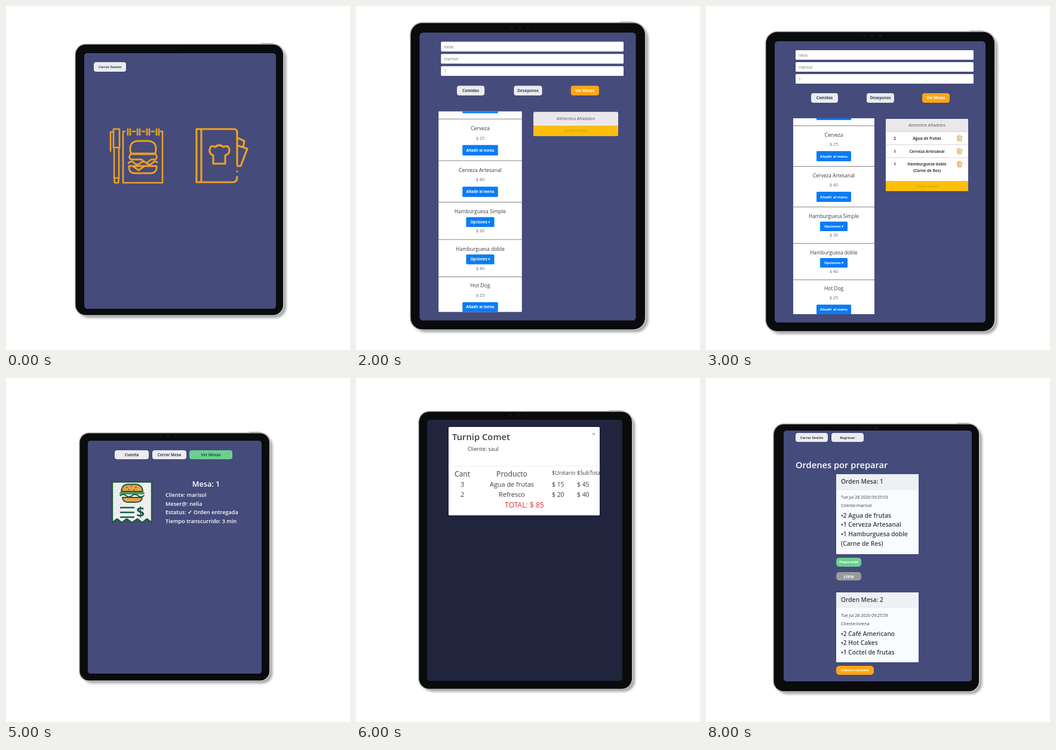
Recreate the animation shown at these times as an HTML page. Size 576x576 px, loop 9000 ms.

```html
<!DOCTYPE html>
<html lang="es">
<head>
<meta charset="utf-8">
<title>Pedidos en tableta</title>
<style>
html, body { margin: 0; width: 100%; height: 100%; overflow: hidden; background: #fff; }
svg { display: block; width: 100vw; height: 100vh; font-family: "Open Sans", "Noto Sans", sans-serif; }
.scene { visibility: hidden; }
.scene.on { visibility: visible; }
</style>
</head>
<body>
<svg id="stage" viewBox="0 0 576 576">
  <defs><filter id="soft"><feGaussianBlur stdDeviation="2"/></filter></defs>
</svg>
<script>
const NAVY = '#454b7b', ORANGE = '#fca616', INK = '#3c3d45', PALE = '#ebecef',
  GREEN = '#6ccf90', BLUE = '#0a7cf5', GOLD = '#eda11f', LEAF = '#205a42';

// Drawing helpers; each returns SVG markup.
const rect = (x, y, x2, y2, fill, r = 0, more = '') =>
  `<rect x="${x}" y="${y}" width="${x2 - x}" height="${y2 - y}" rx="${r}" fill="${fill}" ${more}/>`;
const text = (x, y, size, str, fill = INK, weight = 400, anchor = 'start', more = '') =>
  `<text x="${x}" y="${y}" font-size="${size}" fill="${fill}" font-weight="${weight}" text-anchor="${anchor}" ${more}>${str}</text>`;
const mid = (x, y, size, str, fill, weight) => text(x, y, size, str, fill, weight, 'middle');
const path = (d, stroke, width = 1, fill = 'none') =>
  `<path d="${d}" stroke="${stroke}" stroke-width="${width}" fill="${fill}" stroke-linejoin="round" stroke-linecap="round"/>`;
const button = (x, y, x2, y2, label, size, fill = PALE, color = '#393c55', r = 4) =>
  rect(x, y, x2, y2, fill, r) + mid((x + x2) / 2, (y + y2) / 2 + size * .36, size, label, color, 700);

// body is [x, y, width, height], screen is [left, top, right, bottom].
function tablet([x, y, w, h], screen, content, color = NAVY) {
  const s = w / 350, x2 = x + w, y2 = y + h;
  const dots = [.43, .465, .5].map(k =>
    `<circle cx="${x + w * k}" cy="${y + 7.5 * s}" r="${1.8 * s}" fill="#151722"/>`).join('');
  return rect(x + 6, y + 6, x2 + 3, y2 + 3, '#777', 18 * s, 'filter="url(#soft)" opacity=".7"') +
    path(`M${x + w * .89} ${y - .3}h${w * .055}M${x2 + .3} ${y + h * .1}v${h * .035}m0 ${h * .015}v${h * .03}`, '#aaa', 1.5) +
    rect(x, y, x2, y2, '#c3c4c1', 18 * s) +
    rect(x + 1.5, y + 1.5, x2 - 2, y2 - 1.5, '#0a0b0c', 17 * s) + dots +
    rect(...screen, color, 5 * s) + content;
}

// Fits a drawing made for box a into box b.
const refit = (art, a, b) => {
  const kx = b[2] / a[2], ky = b[3] / a[3];
  return `<g transform="translate(${b[0] - a[0] * kx} ${b[1] - a[1] * ky}) scale(${kx} ${ky})">${art}</g>`;
};

function home() {
  const rings = [204, 220, 236, 252].map(x => `M${x} 206v10m4-10v10`).join('');
  const pad = 'M199 210H196V296H262V210H259M212 210h4m12 0h4m12 0h4' + rings;
  const pen = 'M180 206h10v31h-10ZM180 211h-5v32M181 237v51l1 8h6l1-8v-51M181 288h8';
  const burger = 'M209 247Q204 227 221 226H238Q255 227 250 247Z' +
    'M209 248h41q5 5 0 9h-7l-8 6-8-6h-18q-5-4 0-9Z' +
    'M205 263q5-5 10 0t10 0 10 0 10 0 8-1' +
    'M206 268H252V272Q251 280 242 280H216Q207 280 206 272ZM212 268l10 7 10-7';
  const book = 'M387 267V212Q387 206 381 206H319V295H380Q387 295 387 286M327 206V295M387 277v.1' +
    'M388 221l11 5-2 10M389 234l15 5-11 29h-5';
  const hat = 'M347 264V250Q340 248 341 240Q343 232 350 236Q357 230 364 236Q372 232 374 240Q375 248 367 250V264Z';
  return button(147, 94, 201, 110, 'Cerrar Sesión', 5.8) +
    path(pad, GOLD, 2.6) + path(pen, GOLD, 2.6) + path(burger, GOLD, 2.8) +
    path(book, GOLD, 3.2) + path(hat, GOLD, 3.2);
}

function welcome() {
  return rect(126.5, 72, 439.5, 511, '#fff') +
    text(203, 157, 40, 'TURNIP', '#3d467f', 500, 'start', 'font-family="Roboto, sans-serif" letter-spacing="5"') +
    `<circle cx="288" cy="296" r="78" fill="${ORANGE}"/>` +
    text(289, 318, 41, 'Comet', '#5a3a20', 700, 'middle', 'font-family="Liberation Serif, serif" font-style="italic"') +
    rect(226, 447, 342, 477, ORANGE, 15, 'stroke="#98917f"') +
    mid(284, 472, 22, 'Entrar', '#fff', 700);
}

function orderPage(items) {
  let out = ['nelia', 'marisol', '1'].map((v, i) =>
    rect(150, 74 + i * 20, 448, 90 + i * 20, '#fff', 1.5) + text(155, 84.5 + i * 20, 6.7, v, '#777')).join('');
  out += button(176, 146, 221, 162, 'Comidas', 6.4) + button(269, 146, 315, 162, 'Desayunos', 6.4) +
    button(362, 146, 408, 162, 'Ver Mesas', 6.2, ORANGE, '#fff');

  out += rect(146, 188, 282, 516, '#fff') + rect(185, 188, 243, 191, BLUE);
  const add = (title, price, y) => mid(214, y, 8.4, title) + mid(214, y + 15, 7, price, '#666') +
    button(185, y + 24, 243, Math.min(y + 41, 516), 'Añadir al menu', 6, BLUE, '#fff', 1.5);
  const choose = (title, price, y) => mid(214, y, 8.4, title) + mid(214, y + 31, 7, price, '#666') +
    button(191, y + 6, 237, y + 22, 'Opciones ▾', 6, BLUE, '#fff', 1.5);
  out += add('Cerveza', '$ 25', 219) + add('Cerveza Artesanal', '$ 40', 287) +
    choose('Hamburguesa Simple', '$ 30', 355) + choose('Hamburguesa doble', '$ 40', 416) +
    add('Hot Dog', '$ 25', 476);
  out += path('M146 200.5H282M146 268.5H282M146 336.5H282M146 397.5H282M146 458.5H282', '#85868c');

  const end = items.length ? 293 : 211;
  out += rect(301, 189, 439, end + 17, '#fff', 2) + rect(301, 189, 439, 210, '#ebe8eb', 2) +
    mid(370, 202, 6.7, 'Alimentos Añadidos', '#555');
  items.forEach(([n, name, extra], i) => {
    const y = 224 + i * 21.7;
    out += path(`M301 ${y - 13.5}H439`, '#c9c9cc', .8) + mid(316, y, 6.5, n, INK, 700) +
      mid(370, y, 6.5, name, INK, 700) + (extra ? mid(370, y + 11, 6.5, extra, INK, 700) : '') +
      path(`M420 ${y - 5}h9m-8 0l1 7h5l1-7m-6-2h4m-3 4v3m2-3v3`, '#d39a35', 1.1);
  });
  return out + rect(301, end, 439, end + 17, '#fdbe0b', 1) + mid(370, end + 10.5, 6, 'Enviar orden', '#c79a28', 600);
}

function tablePage() {
  const lines = ['Cliente: marisol', 'Meser@: nelia', 'Estatus: ✓ Orden entregada', 'Tiempo transcurrido: 3 min'];
  const hatch = [0, 1, 2, 3, 4, 5].map(i => `M180 ${184 + i * 9}l${8 + i * 2}-${8 + i}`).join('');
  const zigzag = 'M178 174H244V242l-8-6-8 6-8-6-9 6-9-6-8 6-8-6-8 6Z';
  const seeds = [[202, 183], [209, 181], [217, 183], [205, 187], [214, 187]]
    .map(([x, y]) => `M${x} ${y}h1`).join('');
  return button(182, 121, 239, 136, 'Cuenta', 6.6) + button(245, 121, 302, 136, 'Cerrar Mesa', 6.5) +
    button(307, 121, 379, 136, 'Ver Mesas', 6.5, GREEN, '#245440') +
    path(zigzag, LEAF, 2.4, '#edf0ef') + path(hatch, '#d9dddc', 1) +
    path('M193 190Q194 178 205 178H216Q228 178 229 190Z', LEAF, 2, '#eda044') + path(seeds, LEAF, 1.4) +
    path('M195 200H228Q227 208 218 208H204Q196 208 195 200Z', LEAF, 2, '#eda044') +
    path('M192 193H230', '#4b9c59', 4) + path('M191 197q5-4 10 0t10 0 10 0 10 0', LEAF, 2) +
    path('M192 217H214M192 225H214M192 233H214', LEAF, 2.4) +
    mid(225, 233, 24, '$', LEAF, 700) +
    mid(335, 182, 12.7, 'Mesa: 1', '#fff', 600) +
    lines.map((s, i) => text(267, 199 + i * 14.7, 9.1, s, '#fff', 600)).join('');
}

function bill() {
  const row = (y, n, name, unit, sum) => mid(178, y, 10.9, n) + mid(261, y, 10.9, name) +
    text(328, y, 10.4, unit) + text(370, y, 10.4, sum);
  return rect(155, 82, 408, 230, '#fff', 1.5) +
    text(161, 104, 14.8, 'Turnip Comet', INK, 600) + mid(398, 97, 8, '×', '#777', 600) +
    text(187, 122, 9.2, 'Cliente: saul') + path('M155 147.5H408', '#eeeeef') +
    mid(178, 165, 12.2, 'Cant') + mid(261, 165, 12.2, 'Producto') +
    text(328, 162, 9, '$Unitario') + text(370, 162, 9, '$SubTotal') +
    rect(408, 150, 440, 170, '#20253d') +
    row(182, 3, 'Agua de frutas', '$ 15', '$ 45') + row(199, 2, 'Refresco', '$ 20', '$ 40') +
    mid(282, 217, 12.1, 'TOTAL: $ 85', '#df2f38');
}

function kitchen() {
  const card = (y, bottom, split, n, time, client, dishes) =>
    rect(218, y, 356, bottom, '#f8fcff', 1) + rect(218, y, 356, split, '#edf1f4', 1) +
    text(226, y + 15.5, 10.2, 'Orden Mesa: ' + n, INK, 600) +
    text(226, y + 41, 7, `Tue Jul 28 2020 ${time}`) + text(226, y + 55, 7.4, 'Cliente:' + client) +
    dishes.map((d, i) => text(226, y + 72.5 + i * 15.8, 10.2, d, INK, 600)).join('');
  return button(150, 92, 204, 107, 'Cerrar Sesión', 5.8) + button(210, 92, 264, 107, 'Regresar', 5.8) +
    text(150, 150.5, 14.7, 'Ordenes por preparar', '#fff', 600) +
    card(161, 295, 188, 1, '09:25:03', 'marisol',
      ['•2 Agua de frutas', '•1 Cerveza Artesanal', '•1 Hamburguesa doble', '(Carne de Res)']) +
    button(218, 301, 260, 316, 'Preparando', 5.5, GREEN, '#fff', 5) +
    button(218, 325, 260, 339, 'Lista', 7, '#9b9b9b', '#fff', 5) +
    card(359, 476, 385, 2, '09:25:59', 'lorena',
      ['•2 Café Americano', '•2 Hot Cakes', '•1 Coctel de frutas']) +
    button(218, 482, 281, 497, 'Empezar a preparar', 4.8, ORANGE, '#fff', 5);
}

const orderBox = [99, 42, 386, 504], tableBox = [122, 91, 321, 417], kitchenBox = [112, 76, 347, 450];
const items = [[2, 'Agua de frutas'], [1, 'Cerveza Artesanal'], [1, 'Hamburguesa doble', '(Carne de Res)']];
const order = list => tablet(orderBox, [115, 59, 468, 530], orderPage(list));
const table = tablet(tableBox, [137, 105, 428, 495], tablePage());
const prep = tablet(kitchenBox, [130, 88, 445, 508], kitchen());

const scenes = [
  tablet([115, 63, 351, 456], [131, 79, 452, 507], home()),
  tablet([89, 33, 386, 502], [107, 52.5, 459, 519], welcome()),
  refit(order([]), orderBox, [90, 27, 396, 516]),
  order(items),
  refit(table, tableBox, [107, 56, 353, 459]),
  table,
  tablet([104, 55, 360, 467], [119, 70, 446, 507], bill(), '#20253d'),
  refit(prep, kitchenBox, [95, 39, 377, 490]),
  prep
];

const stage = document.getElementById('stage');
stage.insertAdjacentHTML('beforeend', scenes.map(s => `<g class="scene">${s}</g>`).join(''));
const groups = [...stage.querySelectorAll('.scene')];
const start = performance.now();

function draw(now) {
  const current = Math.floor(Math.max(0, now - start) / 1000) % scenes.length;
  groups.forEach((g, i) => g.classList.toggle('on', i === current));
  requestAnimationFrame(draw);
}
draw(start);
</script>
</body>
</html>
```
